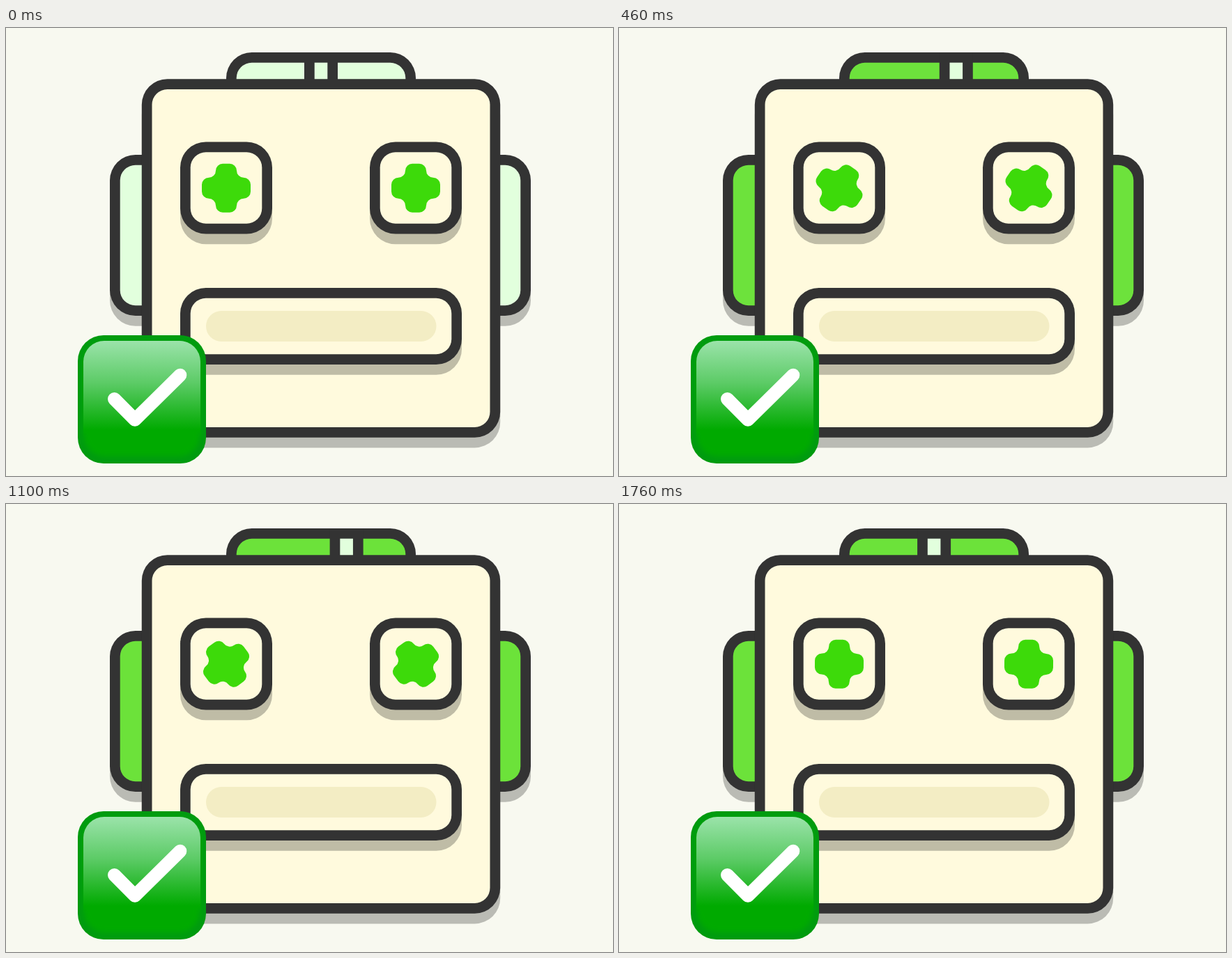
An HTML page that plays this animation: 871x643 px, repeating every 2460 ms.

```html
<!DOCTYPE html>
<html lang="en">
<head>
<meta charset="utf-8">
<title>Robot</title>
<style>
html, body { margin: 0; width: 100%; height: 100%; overflow: hidden; background: #f8f9f0; }
svg { display: block; width: 100%; height: 100%; }
</style>
</head>
<body>
<svg id="stage" viewBox="0 0 871 643">
  <defs>
    <linearGradient id="gloss" x1="0" y1="0" x2="0" y2="1">
      <stop offset="0" stop-color="#9be3aa"/>
      <stop offset=".36" stop-color="#5ccb66"/>
      <stop offset=".76" stop-color="#00aa00"/>
      <stop offset=".82" stop-color="#00aa00" stop-opacity="0"/>
    </linearGradient>
    <filter id="soft" x="-10%" y="-10%" width="120%" height="120%">
      <feGaussianBlur stdDeviation="3.5"/>
    </filter>
    <path id="plus" fill="#3dda0a"/>
  </defs>
  <g id="robot"></g>
  <g id="badge">
    <rect x="103" y="441" width="184" height="184" rx="37" fill="#009b0f"/>
    <rect x="112" y="452" width="166" height="163" rx="30" fill="#00aa00" filter="url(#soft)"/>
    <rect x="111" y="449" width="168" height="168" rx="30" fill="url(#gloss)"/>
    <path d="M155.5 532.5 185 562.3 249.8 498.3" fill="none" stroke="#fff" stroke-width="19"
      stroke-linecap="round" stroke-linejoin="round"/>
  </g>
</svg>
<script>
const LOOP = 2460, START = 115, HALF = 850, FADE = 400;
const UNIT = 14.7, INK = '#333', CREAM = '#fffadd';
const PALE = [226, 255, 221], VIVID = [108, 226, 58];
const SHIFT = 46, TURN = 180;

const robot = document.getElementById('robot');

function add(tag, attrs) {
  const el = document.createElementNS('http://www.w3.org/2000/svg', tag);
  for (const key in attrs) el.setAttribute(key, attrs[key]);
  return robot.appendChild(el);
}

// Bordered box given by its outer edges, with an optional flat shadow below.
function box(x, y, w, h, fill, { r = 2.5 * UNIT, shadow = true } = {}) {
  if (shadow) add('rect', { x, y: y + UNIT, width: w, height: h, rx: r, fill: '#000', 'fill-opacity': .25 });
  add('rect', { x, y, width: w, height: h, rx: r, fill: INK });
  return add('rect', {
    x: x + UNIT, y: y + UNIT, width: w - 2 * UNIT, height: h - 2 * UNIT,
    rx: Math.max(0, r - UNIT), fill
  });
}

function plusPath() {
  const arm = 'l10 0a10 10 0 0 1 10 10a10 10 0 0 0 10 10a10 10 0 0 1 10 10';
  const turned = [[1, 0], [0, 1], [-1, 0], [0, -1]].map(([c, s]) => {
    const p = (x, y) => `${x * c - y * s} ${x * s + y * c}`;
    return `L${p(5, -35)}A10 10 0 0 1 ${p(15, -25)}A10 10 0 0 0 ${p(25, -15)}A10 10 0 0 1 ${p(35, -5)}`;
  });
  return 'M-5 -35' + turned.join('') + 'Z';
}
document.getElementById('plus').setAttribute('d', plusPath().replace(/-0 /g, '0 '));

const tinted = [
  box(149, 182, 120, 231, ''),
  box(633, 182, 120, 231, ''),
  box(316, 35, 272, 110, '', { shadow: false })
];
const antennaParts = [
  add('rect', { x: 428, y: 35, width: 48, height: 60, fill: INK }),
  add('rect', { x: 428 + UNIT, y: 49.7, width: 48 - 2 * UNIT, height: 40, fill: `rgb(${PALE})` })
];
box(194.8, 73.3, 514.4, 514.4, CREAM);
const pupils = [250, 522].map(x => {
  box(x, 163.5, 132, 132, CREAM);
  return [add('use', { href: '#plus' }), x + 66];
});
box(250, 373, 404, 110, CREAM);
add('rect', { x: 287, y: 406, width: 330.5, height: 44, rx: 22, fill: '#f3edc4' });

const clamp = v => Math.min(1, Math.max(0, v));

// The CSS "ease" curve: cubic-bezier(.25, .1, .25, 1).
function ease(t) {
  const x = clamp(t);
  let lo = 0, hi = 1;
  for (let i = 0; i < 24; i++) {
    const s = (lo + hi) / 2;
    if (.75 * s - .75 * s * s + s ** 3 < x) lo = s; else hi = s;
  }
  return .3 * lo + 2.4 * lo * lo - 1.7 * lo ** 3;
}

function render(ms) {
  const t = ms % LOOP - START;
  const swing = ease(t / HALF) - ease(t / HALF - 1);
  const tint = ease(t / FADE);
  const color = PALE.map((c, i) => Math.round(c + (VIVID[i] - c) * tint));
  tinted.forEach(el => el.setAttribute('fill', `rgb(${color})`));
  antennaParts.forEach(el => el.setAttribute('transform', `translate(${SHIFT * swing} 0)`));
  pupils.forEach(([el, x]) =>
    el.setAttribute('transform', `translate(${x} 229.7) rotate(${TURN * swing})`));
}

let origin = null;
function tick(now) {
  if (origin === null) origin = now;
  render(Math.max(0, now - origin));
  requestAnimationFrame(tick);
}
render(0);
requestAnimationFrame(tick);
</script>
</body>
</html>
```
